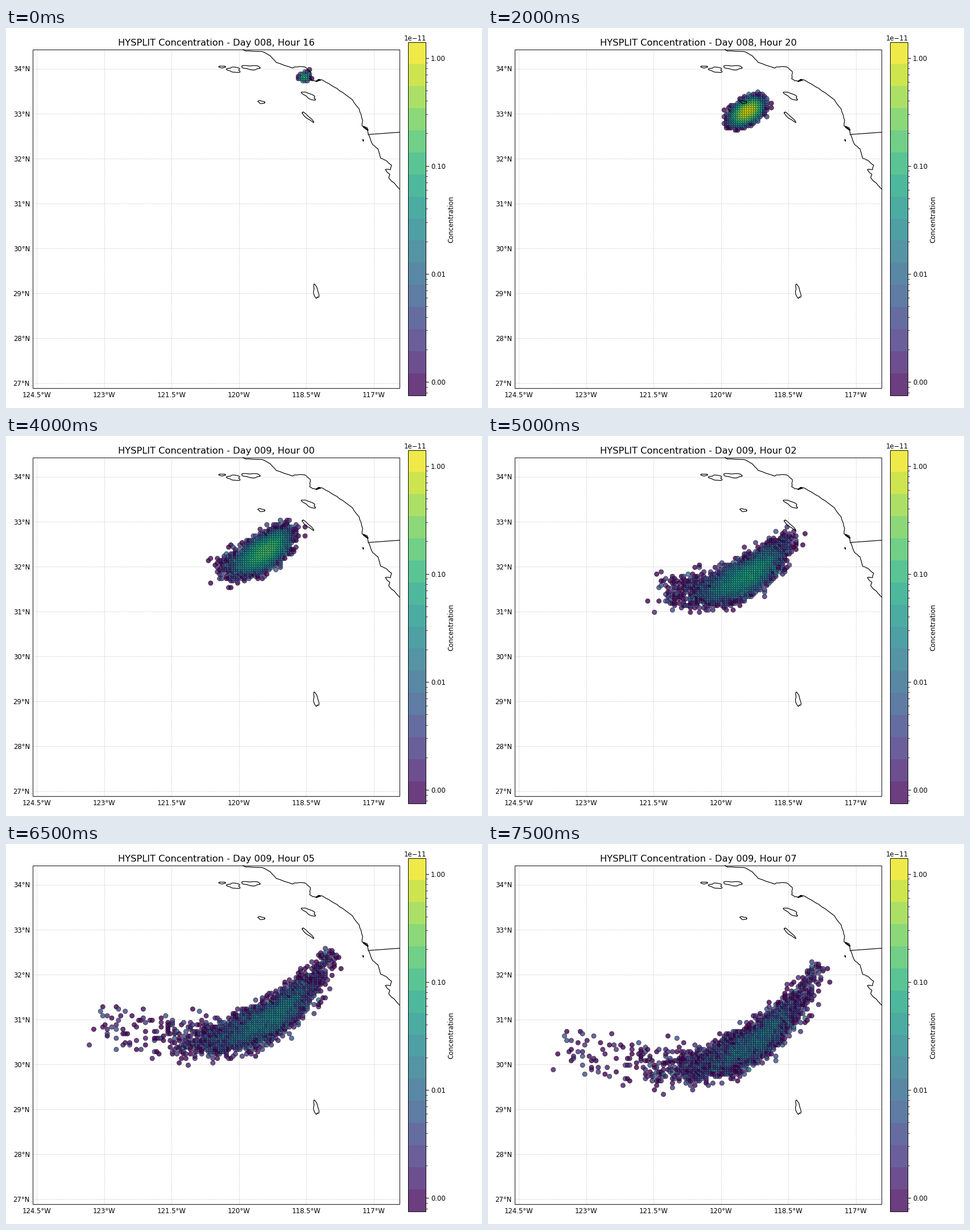
Animation, 837 px wide and 669 px high, one loop 8 s. Source, as a matplotlib script:

```python
import numpy as np
import matplotlib.pyplot as plt
from matplotlib.animation import FuncAnimation
from matplotlib.colors import LogNorm
from matplotlib.patches import Rectangle

W, H, DPI = 837, 669, 64
PT = 72 / DPI                      # points per pixel
DEG = 79.05                        # pixels per degree
CELL = DEG / 20                    # grid cell of 0.05 degrees
HOURS = 16
FONT, TITLE = 11.6 * PT, 16.28 * PT

plt.rcParams["font.family"] = "DejaVu Sans"
fig = plt.figure(figsize=(W / DPI, H / DPI), dpi=DPI, facecolor="white")
ax = fig.add_axes([0, 0, 1, 1])
ax.set(xlim=(0, W), ylim=(H + 0.5, 0.5))
ax.axis("off")
rng = np.random.default_rng(8)


def line(x, y, width=1.2, color="black", **kw):
    ax.plot(x, y, color=color, lw=width * PT, **kw)


def label(x, y, s, ha="center", va="center_baseline", size=FONT, **kw):
    return ax.text(x, y, s, ha=ha, va=va, fontsize=size, **kw)


def frame(x, y, w, h):
    ax.add_patch(Rectangle((x, y), w, h, fill=False, lw=0.93 * PT, zorder=5))


# --- map ------------------------------------------------------------------
def coast(pts, steps=4, jitter=0.35):
    """Polyline through key points with a slightly ragged edge."""
    pts = np.array(pts, float)
    t = np.linspace(0, len(pts) - 1, steps * (len(pts) - 1) + 1)
    xy = [np.interp(t, range(len(pts)), c) for c in pts.T]
    rough = rng.normal(0, jitter, (2, t.size)) * (t % 1 > 0)
    line(*(xy + rough), zorder=3)


def island(cx, cy, a, b, angle):
    """Closed, bumpy ellipse with half axes a and b."""
    t = np.linspace(0, 2 * np.pi, 40)
    r = 1 + 0.15 * np.sin(3 * t + cx) + 0.1 * np.sin(5 * t + cy)
    u, v = a * r * np.cos(t), b * r * np.sin(t)
    c, s = np.cos(angle), np.sin(angle)
    line(cx + u * c - v * s, cy + u * s + v * c, zorder=3)


GRID = dict(width=0.58, color="gray", alpha=0.5, ls="--", zorder=4)
for k in range(6):
    x = 54 + 1.5 * DEG * k
    line([x, x], [38, 634], **GRID)
    label(x, 646, f"{124.5 - 1.5 * k:g}°W")
for k in range(8):
    y = 72 + DEG * k
    line([47, 692], [y, y], **GRID)
    label(42, y, f"{34 - k}°N", ha="right")

coast([(417, 38), (421, 41), (451, 42), (464, 49), (475, 61), (504, 71),
       (508, 69), (525, 69), (535, 77), (534, 90), (546, 95), (549, 91),
       (556, 92), (582, 107), (604, 123), (621, 143), (627, 163), (626, 173),
       (635, 176), (637, 187), (645, 206), (654, 213), (659, 230), (667, 233),
       (678, 242), (676, 250), (667, 250), (675, 259), (673, 264), (692, 284)])
line([546, 552], [94, 92], 2.5, zorder=3)
line([629, 636], [175, 180], 2.5, zorder=3)
line([637, 692], [188, 184], zorder=3)
island(380, 69, 6, 1.5, 0)
island(401, 74, 11, 4.5, 0.1)
island(431, 70, 16, 3.5, 0.05)
island(449, 131, 6, 2.2, 0.2)
island(533, 120, 13, 4, 0.5)
island(530, 157, 13, 2.2, 0.7)
island(545, 465, 12, 4, 1.4)
island(628, 198, 1.5, 0.5, 1.3)
frame(47.5, 38, 645, 596)
title = label(370, 31.5, "", size=TITLE, va="baseline")

# --- colour bar -----------------------------------------------------------
DECADE, Y_ONE = 190.2, 53
LEFT, RIGHT, TOP, BOTTOM, BANDS = 707.5, 738.5, 25, 647, 16


def bar_value(y):
    return 10 ** ((Y_ONE - y) / DECADE)


norm = LogNorm(bar_value(BOTTOM), bar_value(TOP), clip=True)
viridis = plt.get_cmap("viridis")
band = (BOTTOM - TOP) / BANDS
for k in range(BANDS):
    ax.add_patch(Rectangle((LEFT, TOP + k * band), RIGHT - LEFT, band, lw=0,
                           fc=viridis(1 - (k + 0.5) / BANDS), alpha=0.8,
                           antialiased=False))
frame(LEFT, TOP, RIGHT - LEFT, BOTTOM - TOP)

for e in range(-4, 1):
    for m in range(1, 10):
        y = Y_ONE - DECADE * (e + np.log10(m))
        if TOP < y < BOTTOM:
            major = m == 1
            line([RIGHT, RIGHT + (4.1 if major else 2.3)], [y, y],
                 0.93 if major else 0.7)
            if major:
                label(747, y, f"{10.0 ** e:.2f}", ha="left")
label(739, 22, "1e−11", ha="right", va="baseline")
label(782.7, 337, "Concentration", va="center", rotation=90)

# --- plume ----------------------------------------------------------------
# The spine is a Bezier curve: tail, control point and head at key hours.
KEYS = [0, 4, 8, 12, 15]
TAIL = [(512, 92), (416, 172), (345, 246), (176, 288), (128, 352)]
BEND = [(526, 86), (456, 150), (458, 228), (448, 395), (460, 485)]
HEAD = [(540, 80), (492, 121), (512, 148), (572, 168), (586, 200)]

N = 20000
along, across = np.clip(rng.normal(size=(2, N)), -4, 4)
mass = 1.2e-3 * np.exp(rng.normal(0, 0.8, N))
strays = np.zeros(N)               # particles that spread over the whole spine
strays[:3000:8] = 1
anywhere = rng.uniform(-4, 3.7, N)

COLS, ROWS = np.arange(-103, 23), np.arange(-6, 97)
XC, YC = 518 + CELL * COLS, 89.5 + CELL * ROWS
X_EDGES = np.append(XC, XC[-1] + CELL) - CELL / 2
Y_EDGES = np.append(YC, YC[-1] + CELL) - CELL / 2


def at(hour, pts):
    return [np.interp(hour, KEYS, c) for c in zip(*pts)]


def plume(hour):
    """Cell centres and concentrations of the gridded particles."""
    n = int(10 ** np.interp(hour, [0, 4, 8, 15], [2.58, 4.3, 4.0, 3.5]))
    age = min(hour / 12, 1)
    z = along[:n] + age * strays[:n] * (anywhere[:n] - along[:n])
    v = (z + 4) / 8
    u = v + 0.5 * age * v * (1 - v)

    (x0, y0), (x1, y1), (x2, y2) = (at(hour, p) for p in (TAIL, BEND, HEAD))
    x = (1 - u) ** 2 * x0 + 2 * u * (1 - u) * x1 + u * u * x2
    y = (1 - u) ** 2 * y0 + 2 * u * (1 - u) * y1 + u * u * y2
    dx = (1 - u) * (x1 - x0) + u * (x2 - x1)
    dy = (1 - u) * (y1 - y0) + u * (y2 - y1)

    width = min(3 + 0.95 * hour, 14.5)
    taper = 0.2 * np.clip(-1 - z, 0, 2) - 0.1 * np.clip(z, 0, 4)
    off = across[:n] * width * (1 + age * taper) / np.hypot(dx, dy)
    conc = np.histogram2d(x - off * dy, y + off * dx, [X_EDGES, Y_EDGES],
                          weights=mass[:n])[0][:, ::-1]
    i, j = np.nonzero(conc)
    return np.column_stack([XC[i], YC[::-1][j]]), conc[i, j]


dots = ax.scatter([], [], s=(8.2 * PT) ** 2, c=[], cmap=viridis, norm=norm,
                  alpha=0.8, edgecolors="black", linewidths=0.6 * PT, zorder=2)


def draw(hour):
    xy, conc = plume(hour)
    dots.set_offsets(xy)
    dots.set_array(conc)
    day, clock = divmod(16 + hour, 24)
    title.set_text(f"HYSPLIT Concentration - Day {8 + day:03d}, "
                   f"Hour {clock:02d}")
    return dots, title


anim = FuncAnimation(fig, draw, frames=HOURS, interval=500, repeat=True,
                     repeat_delay=0)
plt.show()
```
